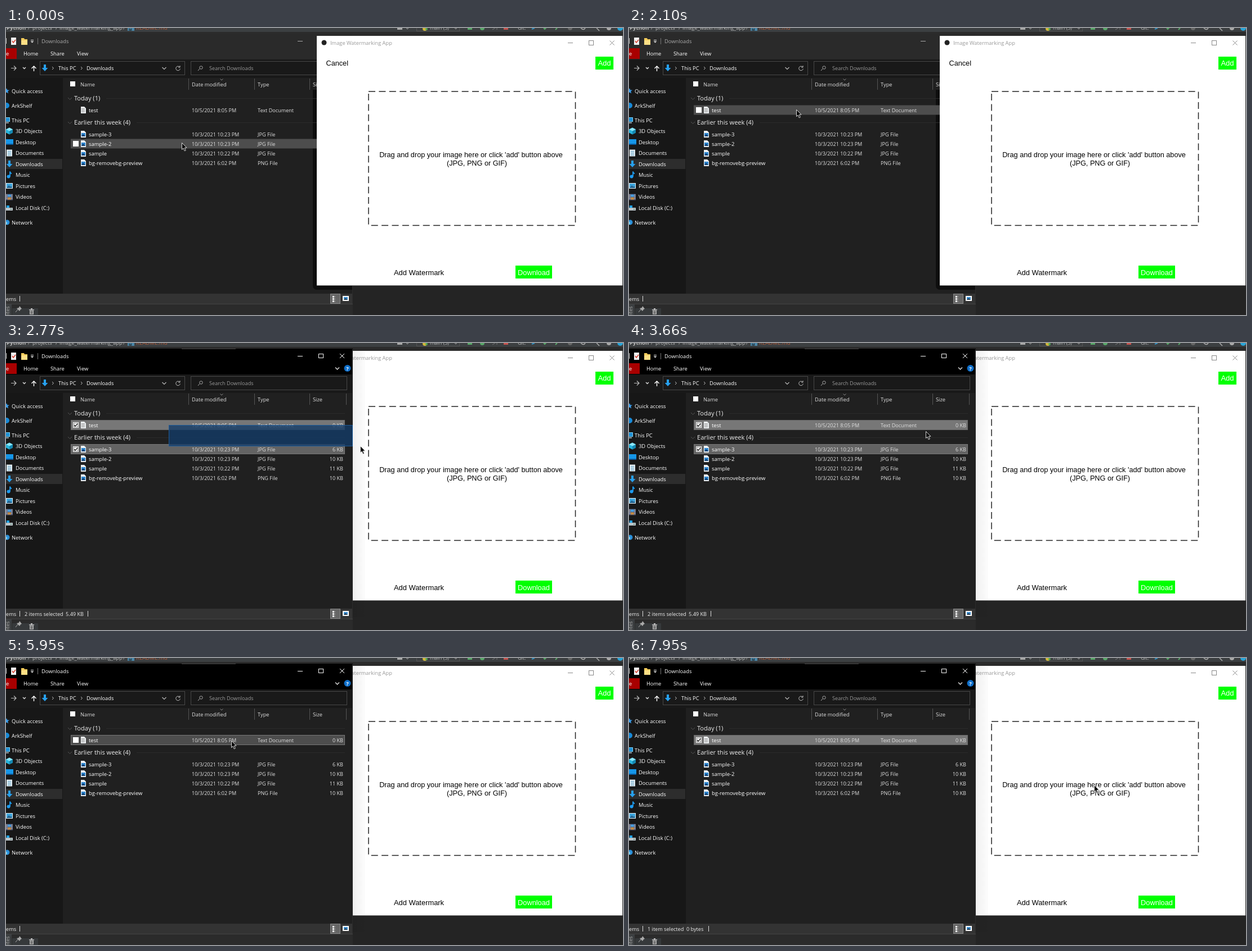
Write an HTML page with a canvas that moves like this. It is 1096 by 511 pixels and loops after 8 s.

```html
<!DOCTYPE html>
<html lang="en">
<head>
<meta charset="utf-8">
<title>Drag and drop</title>
<style>
html, body { margin: 0; width: 100%; height: 100%; overflow: hidden; background: #242424; }
canvas { display: block; }
</style>
</head>
<body>
<canvas id="stage" width="1096" height="511"></canvas>
<script>
const g = document.getElementById('stage').getContext('2d');
const UI = '"Open Sans", "Noto Sans", sans-serif';
const TK = '"Liberation Sans", Arial, sans-serif';
const LOOP = 8000;

function box(x, y, w, h, color) { g.fillStyle = color; g.fillRect(x, y, w, h); }
function frame(x, y, w, h, color) {
  g.strokeStyle = color; g.lineWidth = 1;
  g.strokeRect(x + .5, y + .5, w - 1, h - 1);
}
function text(s, x, y, color = '#fff', size = 9.3, font = UI, align = 'left', weight = '') {
  g.font = `${weight} ${size}px ${font}`;
  g.textAlign = align; g.fillStyle = color;
  g.fillText(s, x, y);
}
function line(d, color, width = 1) {
  g.strokeStyle = color; g.lineWidth = width;
  g.stroke(new Path2D(d));
}
function shape(d, color) { g.fillStyle = color; g.fill(new Path2D(d)); }
function dot(x, y, r, color) {
  g.fillStyle = color; g.beginPath(); g.arc(x, y, r, 0, 7); g.fill();
}
function at(x, y, draw) { g.save(); g.translate(x, y); draw(); g.restore(); }

// Icons, drawn around 0,0
const icons = {
  star() { shape('M0-5L1.4-1.6 5-1.5 2.2.8 3.2 4.5 0 2.4-3.2 4.5-2.2.8-5-1.5-1.4-1.6z', '#3ba0f0'); },
  disc() { dot(0, 0, 5, '#1689d8'); },
  pc() { box(-6, -5, 12, 8, '#7fd4f7'); box(-5, -4, 10, 6, '#1c8fd6'); box(-4, 4, 8, 1.5, '#b8c9d4'); },
  cube() { shape('M0-6L6-3V3L0 6-6 3V-3z', '#27b4dc'); shape('M0 0L6-3V3L0 6z', '#1487b0'); shape('M0-6L6-3 0 0-6-3z', '#8ce6f8'); },
  desk() { box(-6, -5, 13, 9, '#1596e8'); box(-6, 3, 13, 2, '#0a5ca0'); },
  doc() { box(-5, -6, 10, 12, '#dfe9ef'); for (const y of [-3, 0, 3]) box(-3, y, 6, 1, '#4c9bc5'); },
  down() { shape('M-2-6H2V0H5.5L0 6-5.5 0H-2z', '#27a0ee'); },
  note() { dot(-1.5, 3, 3, '#1d9bf0'); line('M1 3V-6Q1.5-3 4-2', '#1d9bf0', 1.8); },
  pics() { box(-6, -5, 12, 10, '#e6f2f8'); box(-5, -4, 10, 8, '#3ca4dc'); shape('M-5 4L-1-1 2 2 3 0 5 4z', '#24608a'); },
  film() { box(-6, -5, 12, 11, '#555b78'); box(-3, -4, 6, 4, '#49a0e0'); box(-3, 1, 6, 4, '#c48c43'); for (const y of [-4, -1, 2]) { box(-5, y, 1, 2, '#ddd'); box(4, y, 1, 2, '#ddd'); } },
  disk() { box(-6, 0, 12, 5, '#b9c4c9'); box(-5, -4, 5, 4, '#20a2ea'); box(2, 2, 2, 1, '#2a6b40'); },
  net() { dot(1, 0, 4.5, '#2a8fd8'); box(-6, -1, 7, 5, '#76d0f8'); },
};

const places = [
  ['Quick access', 112, 'star'], ['ArkShelf', 138, 'disc'], ['This PC', 164, 'pc'],
  ['3D Objects', 183.5, 'cube'], ['Desktop', 203, 'desk'], ['Documents', 222.5, 'doc'],
  ['Downloads', 242, 'down'], ['Music', 261.5, 'note'], ['Pictures', 281, 'pics'],
  ['Videos', 300.5, 'film'], ['Local Disk (C:)', 320, 'disk'], ['Network', 346, 'net'],
];
const files = [
  ['test', 146, '10/5/2021 8:05 PM', 'Text Document', '0 KB'],
  ['sample-3', 189, '10/3/2021 10:23 PM', 'JPG File', '6 KB'],
  ['sample-2', 206, '10/3/2021 10:23 PM', 'JPG File', '10 KB'],
  ['sample', 223, '10/3/2021 10:22 PM', 'JPG File', '11 KB'],
  ['bg-removebg-preview', 240, '10/3/2021 6:02 PM', 'PNG File', '10 KB'],
];

// time, cursor x, cursor y, hovered row (-1 none), mode
const steps = [
  [0, 312, 204, 2, 'idle'],
  [150, 312, 201, 2, 'idle'], [290, 310, 194, 1, 'idle'], [420, 307, 184, 1, 'idle'],
  [560, 304, 171, -1, 'idle'], [690, 301, 160, -1, 'idle'], [820, 299, 152, 0, 'idle'],
  [960, 298, 147, 0, 'idle'], [1090, 297, 145, 0, 'idle'],
  [2230, 289, 146, 0, 'band'], [2370, 350, 152, 0, 'band'], [2500, 462, 166, 0, 'band'],
  [2640, 575, 178, 0, 'band'], [2770, 629, 183, -1, 'band'],
  [3230, 620, 180, -1, 'two'], [3370, 592, 171, -1, 'two'], [3520, 555, 162, -1, 'two'],
  [3660, 527, 157, 0, 'two'], [3800, 518, 155, 0, 'two'], [3940, 514, 152, 0, 'two'],
  [4080, 512, 151, 0, 'two'], [4220, 511, 150, 0, 'two'],
  [4370, 472, 262, -1, 'two'], [4490, 450, 318, -1, 'two'],
  [4920, 449, 312, -1, 'none'], [5070, 427, 264, -1, 'none'], [5220, 397, 199, 3, 'none'],
  [5370, 392, 178, 1, 'none'], [5510, 394, 162, -1, 'none'], [5660, 397, 153, 0, 'none'],
  [5800, 399, 148, 0, 'none'], [5950, 400, 147, 0, 'none'],
  [6220, 400, 146, 0, 'one'], [6370, 422, 144, 0, 'one'],
  [6500, 480, 143, 0, 'drag'], [6650, 560, 148, 0, 'drag'], [6950, 617, 157, 0, 'drag'],
  [7100, 655, 168, 0, 'drag'], [7240, 704, 184, 0, 'drag'], [7380, 755, 203, 0, 'drag'],
  [7520, 798, 217, 0, 'drag'], [7660, 820, 224, 0, 'drag'], [7810, 826, 226, 0, 'drag'],
  [7950, 826, 226, 0, 'one'],
];

function backdrop() {
  box(0, 0, 1096, 511, '#242424');
  box(0, 0, 1096, 7, '#3c3f41');
  box(0, 7, 1096, 7, '#2b2b2b');
  text('Python', 1, 3, '#bbb', 9.6, UI, 'left', 'bold');
  text('projects', 47, 3, '#bbb', 9.3);
  text('image_watermarking_app', 95, 3, '#bbb', 9.3);
  for (const x of [39, 88, 208]) line(`M${x} 0l2 1-2 2`, '#888');
  box(216, 0, 12, 5, '#4a86a8');
  text('M', 218, 5, '#1f2a30', 6, UI, 'left', 'bold');
  text('README.md', 231, 3, '#b55c3c', 9.6);
  box(695, 0, 9, 3, '#aaa'); line('M711 0l2 2 2-2', '#aaa');
  frame(729, -8, 77, 14, '#555');
  dot(744, 1, 4, '#d0b63c'); dot(747, 2, 2, '#4eaa55');
  text('main (3)', 753, 3, '#bbb', 9);
  line('M797 0l2 2 2-2', '#aaa');
  box(820, 0, 8, 3, '#59a869'); dot(846, 0, 4, '#59a869');
  line('M864 3l5-3M872 0v3', '#777'); box(884, 0, 8, 3, '#c75450');
  text('Git:', 909, 3, '#bbb', 9);
  line('M934 2l5-2', '#3592c4', 2); line('M955 0l2 2 3-3M976 3l3-3', '#59a869', 2);
  dot(1002, 0, 4, '#666'); line('M1021 0q5 5 8 0M1049 0l5 5', '#aaa', 1.5);
  dot(1071, 0, 4, '#aaa'); dot(1091, 0, 5, '#2aa5d8');
  box(0, 491, 616, 20, '#2b2b2b');
  box(0, 492, 10, 19, '#3c3f41');
  box(11, 499, 46, 12, '#36393b');
  at(7, 514, () => { g.rotate(-Math.PI / 2); text('rites', 0, -1, '#aaa', 9); });
  line('M17 506l4-5', '#aaa'); shape('M19 499l5 5 2-3 2-1-4-5-1 3z', '#aaa');
  box(41, 501, 9, 1.5, '#bbb'); box(44, 499, 3, 2, '#bbb');
  box(42, 503, 7, 7, '#aaa'); line('M44.5 504v5M46.5 504v5', '#444');
}

function page(y, plain) {
  shape(`M133 ${y - 6}h6l3 3v9h-9z`, '#eef1f3');
  if (plain) for (let i = -3; i < 5; i += 2) box(134, y + i, 6, 1, '#999');
  else { box(134, y - 2, 7, 6, '#2e86cf'); shape(`M134 ${y + 4}l3-4 4 4z`, '#0f3c6c'); }
}

function fileRow([name, y, date, kind, size], i, s) {
  const selected = s.picked.includes(i), hover = s.hover === i;
  if (selected) {
    box(115, y - 9, 487, 18, i ? '#636363' : '#777');
    frame(115, y - 9, 487, 18, i ? '#777' : '#686868');
  } else if (hover) box(115, y - 8.5, 487, 17, '#4d4d4d');
  if (s.mode === 'none' && i === 0) frame(115, y - 9, 487, 18, '#777');
  if (selected || hover) {
    box(119, y - 5, 10, 10, '#fff');
    if (selected) {
      box(120, y - 4, 8, 8, '#222'); box(120.5, y - 3.5, 7, 7, '#fff');
      line(`M121 ${y}l2 2 4-4`, '#111', 1.3);
    }
  }
  page(y, i === 0);
  text(name, 147, y + 3.5, '#fff', 9.45);
  text(date, 330, y + 3.5, '#e0e0e0', 9.05);
  text(kind, 447, y + 3.5, '#e0e0e0', 9.1);
  text(size, 599, y + 3.5, '#e0e0e0', 9.1, UI, 'right');
}

function explorer(s) {
  const tone = s.active ? '#fff' : '#aaa';
  box(0, 10, 616, 482, '#202020');
  box(0, 10, 616, 46, s.active ? '#000' : '#2a2a2a');
  if (s.active) box(312, 10, 96, 1, '#444');
  box(0, 56, 616, 33, '#191919');

  // Title bar and ribbon tabs
  box(0, 18, 1, 10, '#ccc');
  box(9, 17, 9, 13, '#f0f0f0'); line('M11 23l2 3 4-5', '#d83b2c', 1.5);
  shape('M27 18h5l1 2h5v10h-11z', '#f4cc5c'); shape('M27 22h11v8h-11z', '#ffdf85');
  box(44, 21, 5, 1, '#ddd'); shape('M43.5 23.5h6l-3 3z', '#ddd');
  box(56, 18, 1, 11, '#777');
  text('Downloads', 63, 26.5, tone);
  line('M518 23.5h9', tone);
  if (s.active) {
    frame(555, 19, 9, 8, '#fff'); line('M593 19l8 8M601 19l-8 8', '#fff');
    line('M585 43.5l3.5 3.5 3.5-3.5', '#ddd', 1.4);
    dot(606.5, 45, 6, '#0f6fca'); text('?', 606.5, 48.5, '#fff', 9.5, UI, 'center', 'bold');
  }
  box(0, 36, 19, 19, '#a80000'); text('e', 0, 48.5, '#fff');
  text('Home', 31, 48.5); text('Share', 79, 48.5); text('View', 126, 48.5);

  // Address and search
  line('M9 71.5h9m-4-4l4 4-4 4', '#bbb', 1.2);
  line('M30 70l2.5 2.5 2.5-2.5', '#ddd', 1.4);
  line('M49.5 77v-9m-4 4l4-4 4 4', '#fff', 1.4);
  frame(60, 59, 258, 25, '#484848'); frame(328, 59, 278, 25, '#484848');
  at(69, 71, icons.down);
  line('M82 69l2.5 2.5-2.5 2.5M133 69l2.5 2.5-2.5 2.5', '#ccc');
  text('This PC', 93, 75); text('Downloads', 143, 75);
  line('M277.5 70l3.5 3.5 3.5-3.5', '#bbb', 1.2);
  line('M308.5 69.5a3.8 3.8 0 1 0 .8 3M309 67v3h-3', '#bbb');
  line('M341 76l3-3.5M343.8 70.5a2.7 2.7 0 1 0 5.4 0a2.7 2.7 0 1 0-5.4 0', '#aaa');
  text('Search Downloads', 361, 75, '#999', 9.15);

  // Places
  box(0, 89, 101, 384, '#171717');
  box(0, 233, 100, 18, '#2d2d2d');
  places.forEach(([name, y, icon]) => {
    const sub = y > 180 && y < 330;
    at(sub ? 6 : 1, y, icons[icon]);
    text(name, sub ? 17 : 10, y + 3.5, '#fff', 9.4);
  });

  // Column heads
  box(114, 95, 9, 9, '#fff');
  for (const x of [324, 441, 539, 604]) box(x, 90, 1, 20, '#555');
  line('M380.5 90.5l2.5 2.5 2.5-2.5', '#888');
  text('Name', 132, 103.5, '#ddd'); text('Date modified', 330, 103.5, '#ddd');
  text('Type', 447, 103.5, '#ddd'); text('Size', 545, 103.5, '#ddd');

  // Groups and files
  if (!s.active) appShadow();
  for (const [label, y, x] of [['Today (1)', 125, 178], ['Earlier this week (4)', 168, 232]]) {
    line(`M110 ${y - 1}l3.5 3.5 3.5-3.5`, '#555');
    text(label, 121, y + 4, '#eee', 11.05);
    box(x, y, 602 - x, 1, '#2b2b2b');
  }
  files.forEach((f, i) => fileRow(f, i, s));

  // Status bar
  box(0, 473, 616, 18, '#333');
  box(0, 491, 616, 1, '#444');
  box(615, 11, 1, 480, '#2c2c2c');
  text('ems', 0, 485.5, '#eee');
  box(24, 477, 1, 10, '#ddd');
  if (s.picked.length) {
    const two = s.picked.length > 1;
    text(two ? '2 items selected' : '1 item selected', 33, 485.5, '#eee', 9.15);
    text(two ? '5.49 KB' : '0 bytes', two ? 106 : 102, 485.5, '#eee', 9.15);
    box(two ? 145 : 141, 477, 1, 10, '#ddd');
  }
  box(576, 473, 18, 18, '#666'); frame(576, 473, 18, 18, '#888');
  for (const y of [477, 481, 485]) { box(580, y, 3, 3, '#fff'); box(584, y + 1, 1, 1, '#ccc'); }
  box(598, 477, 11, 9, '#fff'); box(600, 479, 7, 5, '#3d8ed0'); shape('M600 484l3-3 4 3z', '#234');

  if (s.mode === 'band') {
    const w = Math.min(s.x, 616) - 289, h = s.y - 145;
    box(289, 146, w, h, 'rgba(18,59,104,.78)');
    frame(289, 146, w, h, '#1d5a98');
  }
}

function appShadow() {
  g.fillStyle = 'rgba(0,0,0,.55)';
  g.beginPath(); g.roundRect(545, 110, 71, 356, [0, 0, 0, 7]); g.fill();
}

function app() {
  box(552, 14, 543, 444, '#fff');
  box(552, 458, 543, 1, '#777');
  dot(565, 26, 4.5, '#222');
  text('Image Watermarking App', 576, 30, '#999', 9.25);
  line('M998 26.5h9', '#888');
  frame(1035, 22, 9, 9, '#888');
  line('M1072.5 22.5l8 8M1080.5 22.5l-8 8', '#888');
  text('Cancel', 568.5, 67, '#000', 12.7, TK);
  box(1047, 51, 32, 23, '#0f0'); text('Add', 1063, 67, '#fff', 13, TK, 'center');
  g.setLineDash([12, 6.4]);
  line('M644 113H1011.5V351.5H644z', '#222', 1.5);
  g.setLineDash([]);
  text("Drag and drop your image here or click 'add' button above", 826, 230, '#000', 12.7, TK, 'center');
  text('(JPG, PNG or GIF)', 836.5, 244.5, '#000', 12.7, TK, 'center');
  text('Add Watermark', 689, 439.5, '#000', 12.9, TK);
  box(905, 423, 65, 23, '#0f0'); text('Download', 937.5, 439.5, '#fff', 12.8, TK, 'center');
}

function edgeShadow() {
  const fade = g.createLinearGradient(616, 0, 638, 0);
  fade.addColorStop(0, 'rgba(0,0,0,.06)'); fade.addColorStop(1, 'rgba(0,0,0,.01)');
  box(616, 14, 22, 474, fade);
}

function ghost(x, y) {
  const fill = g.createLinearGradient(0, y, 0, y + 84);
  fill.addColorStop(0, 'rgba(135,175,192,.52)'); fill.addColorStop(1, 'rgba(112,155,175,.58)');
  g.fillStyle = fill;
  g.beginPath(); g.roundRect(x, y, 84, 84, 2); g.fill();
  g.strokeStyle = 'rgba(110,165,190,.6)'; g.lineWidth = 1; g.stroke();
}

function noDrop(x, y) {
  dot(x, y, 6, '#e8d5d5');
  g.strokeStyle = '#b3262e'; g.lineWidth = 1.6;
  g.beginPath(); g.arc(x, y, 4.8, 0, 7); g.moveTo(x - 3.3, y - 3.3); g.lineTo(x + 3.3, y + 3.3); g.stroke();
}

function cursor(x, y) {
  at(x, y, () => {
    const arrow = 'M.5.5V12.5L3.2 10 5.2 14.8 7.3 13.9 5.3 9.2H9z';
    shape(arrow, '#000'); line(arrow, '#f0f0f0', .9);
  });
}

function stateAt(t) {
  const [, x, y, hover, mode] = steps.findLast(k => k[0] <= t);
  const two = mode === 'two' || (mode === 'band' && y > 180);
  const picked = mode === 'idle' || mode === 'none' ? [] : two ? [0, 1] : [0];
  return { x, y, hover, mode, picked, active: mode !== 'idle' };
}

function draw(now) {
  const s = stateAt(now % LOOP);
  backdrop();
  if (s.active) { app(); edgeShadow(); explorer(s); }
  else { explorer(s); app(); }
  if (s.mode === 'drag') {
    ghost(s.x - 68, s.y - 81);
    if (s.x < 630) noDrop(s.x - 10, s.y + 12.5);
  }
  cursor(s.x, s.y);
}

let start;
function tick(now) {
  start ??= now;
  draw(now - start);
  requestAnimationFrame(tick);
}
draw(0);
requestAnimationFrame(tick);
</script>
</body>
</html>
```
